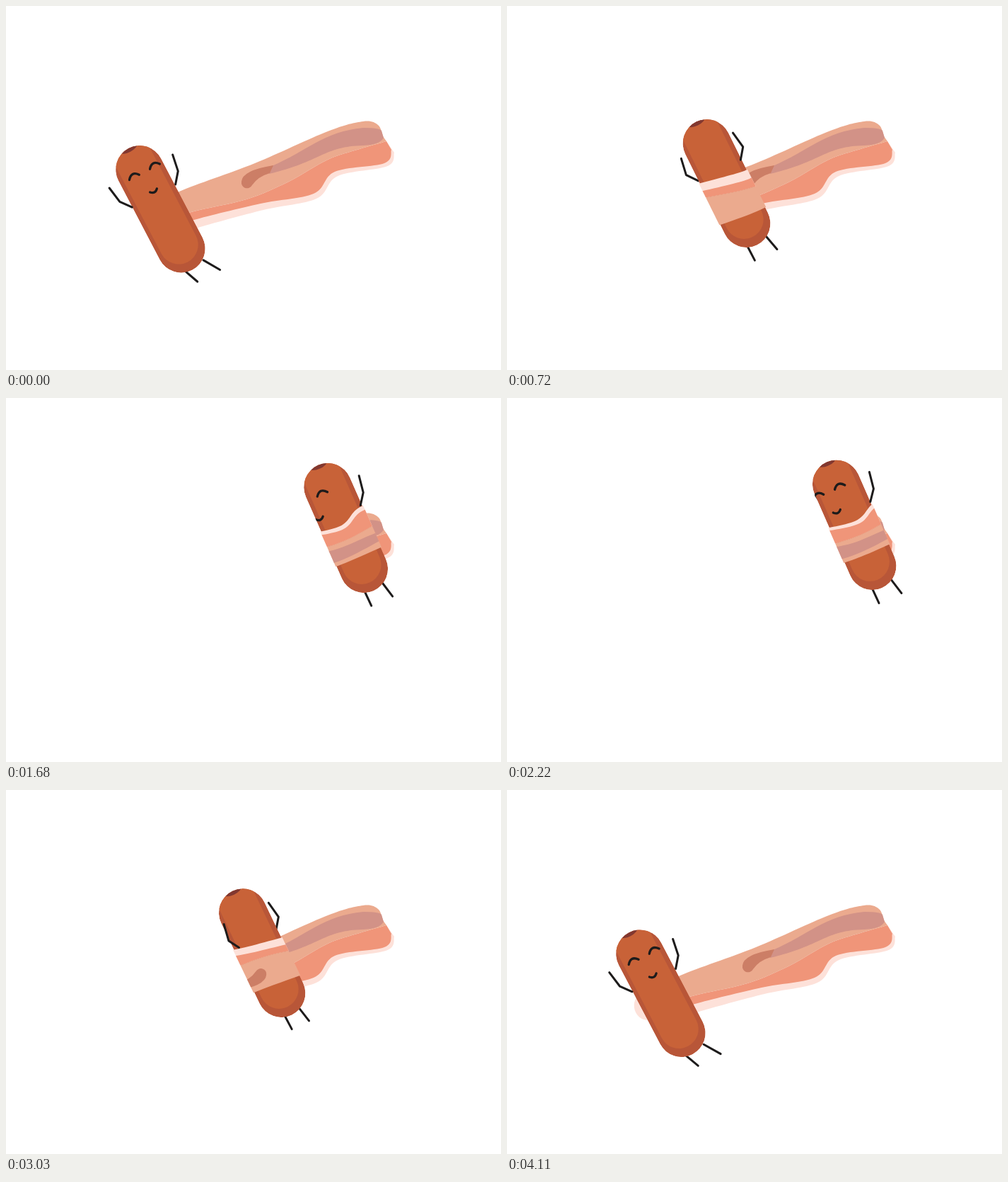
Recreate the animation shown at these times as an HTML page with a canvas. Size 700 by 514 pixels, loop 4170 ms.

```html
<!DOCTYPE html>
<html lang="en">
<head>
<meta charset="utf-8">
<title>Sausage rolling up in bacon</title>
<style>
html, body { margin: 0; width: 100%; height: 100%; overflow: hidden; background: #fff; }
canvas { display: block; }
</style>
</head>
<body>
<canvas id="stage" width="700" height="514"></canvas>
<script>
const ctx = document.getElementById('stage').getContext('2d');
const LOOP = 4170, STEP = 30, LAST = 4110, LEFT = 218;
const PALE = '#fde1d9';

// Bacon edges, each from left to right
const upper = [[205, 286], [245, 262], [352, 222], [455, 177], [505, 163], [526, 168], [533, 184]];
const middle = [[205, 310], [262, 291], [340, 273], [400, 248], [455, 217], [500, 202], [538, 191]];
const lower = [[205, 316], [243, 312], [266, 302], [360, 279], [435, 265], [465, 234], [535, 222], [545, 203]];
const fringe = lower.map(([x, y]) => [x + 4, y + 4 + (545 - x) * 0.027]);

// Smooth curve through the points, joined to whatever is already in the path
function smooth(path, pts) {
  path.lineTo(...pts[0]);
  for (let i = 0; i < pts.length - 1; i++) {
    const a = pts[i - 1] || pts[i], b = pts[i], c = pts[i + 1], d = pts[i + 2] || c;
    path.bezierCurveTo(b[0] + (c[0] - a[0]) / 6, b[1] + (c[1] - a[1]) / 6,
                       c[0] - (d[0] - b[0]) / 6, c[1] - (d[1] - b[1]) / 6, c[0], c[1]);
  }
}

function band(over, under) {
  const path = new Path2D();
  smooth(path, over);
  smooth(path, [...under].reverse());
  path.closePath();
  return path;
}

const layers = [
  [PALE, band(middle, fringe)],
  ['#f09579', band(middle, lower)],
  ['#ebaa8e', band(upper, middle)],
  ['#d29287', new Path2D('M376 226C425 205 450 177 505 172Q528 172 531 176L534 186Q529 196 505 197C450 198 445 220 372 237Z')],
  ['#cc7e66', new Path2D('M378 225Q334 232 333 248A8 8 0 0 0 348 253Q356 241 373 236Z')]
];
const looseEnd = new Path2D('M172 182L258 380H600V100H172Z');

const body = new Path2D();
body.roundRect(-34, -97, 68, 194, 34);
const light = new Path2D();
light.roundRect(-28, -125, 55, 209, 27.5);

function drawBacon() {
  for (const [color, path] of layers) {
    ctx.fillStyle = color;
    ctx.fill(path);
  }
}

function line(...pts) {
  ctx.beginPath();
  pts.forEach(p => ctx.lineTo(...p));
  ctx.stroke();
}

function arm({ angle, lean }) {
  const s = Math.sin(angle);
  line([35 * s, -21], [47 * s, -36], [47 * s + lean, -60]);
}

function arc(x, y, halfWidth, bend) {
  ctx.beginPath();
  ctx.moveTo(x - halfWidth, y);
  ctx.quadraticCurveTo(x, y + bend, x + halfWidth, y);
  ctx.stroke();
}

function drawFace(x) {
  ctx.lineWidth = 3.3;
  arc(x - 16.4, -57, 7.8, -10);
  arc(x + 16.4, -57, 7.8, -10);
  arc(x - 1, -28, 5.5, 6);
}

function scoped(draw) {
  ctx.save();
  draw();
  ctx.restore();
}

function draw(t) {
  const phase = 2 * Math.PI * (t + 78) / LOOP;
  const x = 358.3 - 138.6 * Math.cos(phase) - 2.4 * Math.cos(3 * phase);
  const way = x - LEFT, y = 287 - 0.394 * way;
  const deg = Math.PI / 180, tilt = (0.0147 * way - 27.7) * deg;

  // The limbs swing fast at first, then turn evenly with the roll
  const swing = 1 - Math.exp(-way / 35), twist = Math.exp(-way / 20);
  const right = { angle: (90 + 0.95 * way + 86 * swing) * deg, lean: 4 };
  const left = { angle: (0.8 * way + 80 * swing - 80) * deg, lean: -4 };
  const inFront = limb => Math.cos(limb.angle) > 0;
  const spread = 18 * Math.sin(right.angle);
  const faceX = (190 + 1.3 * way) % 373 - 186;

  ctx.fillStyle = '#fff';
  ctx.fillRect(0, 0, 700, 514);
  ctx.lineCap = ctx.lineJoin = 'round';
  ctx.strokeStyle = '#1d1b1b';

  // Bacon not rolled up yet
  scoped(() => {
    ctx.translate(x, y);
    ctx.rotate(tilt);
    ctx.beginPath();
    ctx.rect(0, -400, 700, 800);
    ctx.clip();
    ctx.resetTransform();
    drawBacon();
  });
  if (t > 3900) {
    ctx.fillStyle = PALE;
    ctx.beginPath();
    ctx.ellipse(196 + (LAST - t) * 0.15, 306, 16, 19, -0.3, 0, 7);
    ctx.fill();
  }

  // Sausage
  scoped(() => {
    ctx.translate(x, y);
    ctx.rotate(tilt);
    ctx.lineWidth = 3;
    for (const side of [-1, 1]) {
      line([2 + 3 * twist + side * spread * 0.85, 92], [5 + 12 * twist + side * spread, 115]);
    }
    [right, left].filter(a => !inFront(a)).forEach(arm);
    scoped(() => {
      ctx.clip(body);
      ctx.fillStyle = '#b85638';
      ctx.fill(body);
      ctx.fillStyle = '#c86238';
      ctx.fill(light);
      ctx.fillStyle = '#823830';
      ctx.beginPath();
      ctx.ellipse(0, -97, 13, 5.5, 0, 0, 7);
      ctx.fill();
      drawFace(faceX);
    });
    ctx.lineWidth = 3;
    [right, left].filter(inFront).forEach(arm);
  });

  // Bacon wrapped over the front: the strip turned round, tightening on the way
  scoped(() => {
    ctx.translate(x, y);
    ctx.rotate(tilt);
    ctx.beginPath();
    ctx.rect(-35.2, -75, 70.4, 150);
    ctx.clip();
    ctx.resetTransform();
    const cx = x - 11.5, cy = y + 24.5;
    ctx.translate(cx, cy);
    ctx.rotate(tilt);
    ctx.scale(-1, 0.0015 * way - 1.19);
    ctx.rotate(-tilt);
    ctx.translate(-cx, -cy);
    ctx.clip(looseEnd);
    drawBacon();
  });
}

const start = performance.now();
function frame() {
  const t = (performance.now() - start) % LOOP;
  draw(Math.min(LAST, Math.floor(t / STEP) * STEP));
  requestAnimationFrame(frame);
}
frame();
</script>
</body>
</html>
```
